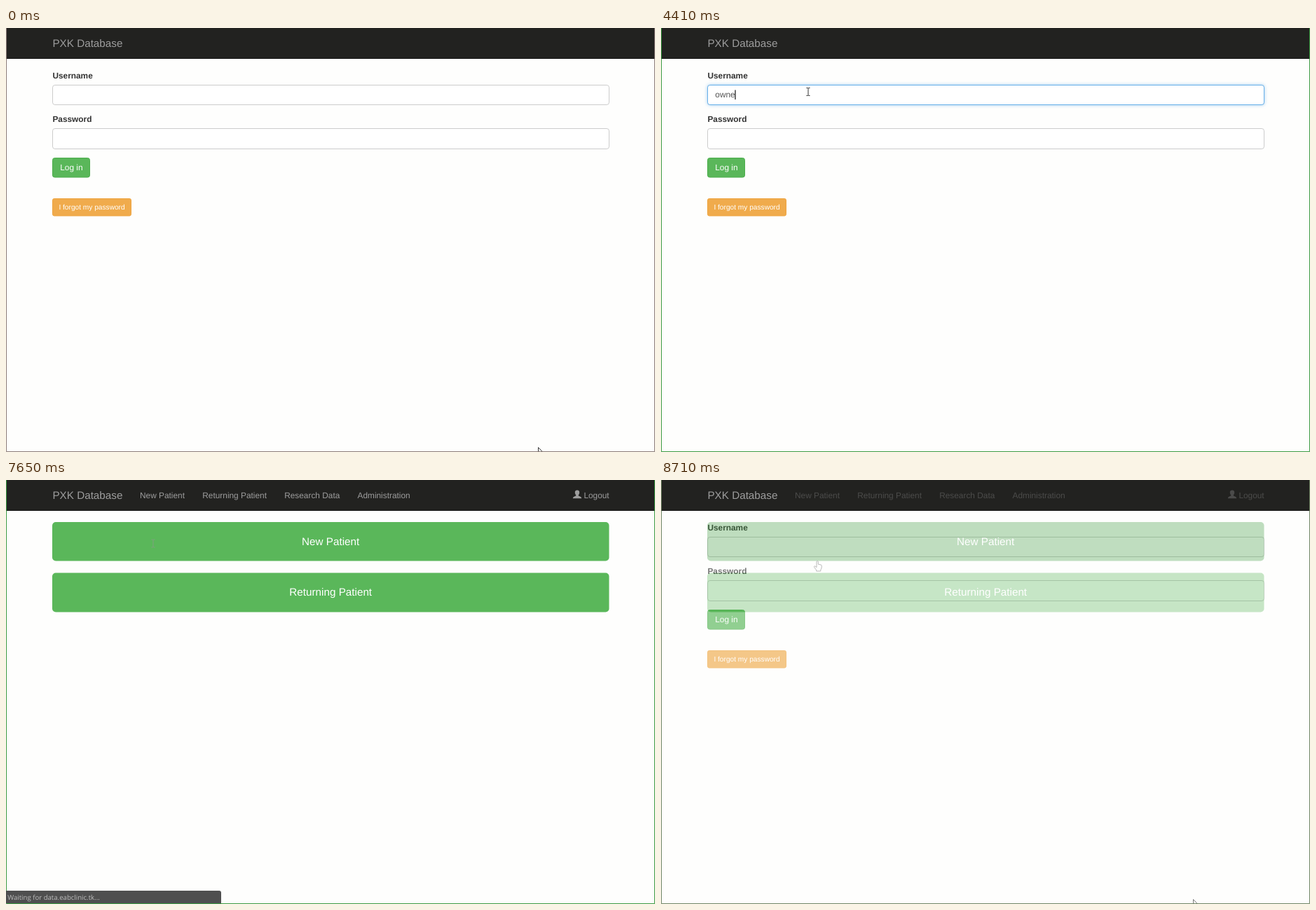
An HTML page for the animation above (8.78 s loop, 926x605 px).

```html
<!DOCTYPE html>
<html lang="en">
<head>
<meta charset="utf-8">
<title>Database login</title>
<style>
html, body { margin: 0; width: 100%; height: 100%; overflow: hidden; background: #fefefd; }
svg { display: block; width: 926px; height: 605px; }
text { font: 11.86px "Liberation Sans", Arial, sans-serif; text-rendering: geometricPrecision; white-space: pre; }
.brand { font-size: 15.25px; fill: #9d9d9d; }
.nav { fill: #9d9d9d; }
.label { font-weight: bold; fill: #333; }
.typed { fill: #555; }
.white { fill: #fff; }
.big { font-size: 15.25px; fill: #fff; text-anchor: middle; }
.small { font-size: 10.16px; fill: #fff; }
.box { fill: #fff; stroke: #ccc; }
.glow { fill: #fff; stroke: #66afe9; filter: drop-shadow(0 0 2.4px rgba(102, 175, 233, .6)); }
.green { fill: #5ab75a; }
.pointer { fill: #fff; stroke: #222; stroke-width: .9; stroke-linejoin: round; }
.beam { fill: none; stroke: #333; stroke-width: 1; }
.status { font: 9.62px "Open Sans", "Noto Sans", sans-serif; fill: #bdbdbd; }
</style>
</head>
<body>
<svg viewBox="0 0 926 605">
  <defs>
    <g id="bar">
      <rect width="926" height="605" fill="#fefefd"/>
      <rect width="926" height="44" fill="#222220"/>
      <rect y="43" width="926" height="1" fill="#121211"/>
      <text class="brand" x="66.4" y="27">PXK Database</text>
    </g>
    <path id="edge" d="M.5 0V604.5H925.5V0" fill="none"/>
    <path id="ibeam" d="M-2.5 -5.5H-.8L0 -4.8L.8 -5.5H2.5M0 -4.8V4.8M-2.5 5.5H-.8L0 4.8L.8 5.5H2.5"/>
  </defs>

  <g id="dash">
    <use href="#bar"/>
    <text class="nav" x="191" y="25.5">New Patient</text>
    <text class="nav" x="280.3" y="25.5">Returning Patient</text>
    <text class="nav" x="397.2" y="25.5">Research Data</text>
    <text class="nav" x="501.5" y="25.5">Administration</text>
    <text class="nav" x="824.4" y="25.5">Logout</text>
    <path class="nav" d="M815 14.5C817.3 14.5 818.3 16 818.2 18C818.1 19.7 817.4 20.7 816.8 21.4V22.4L820 23.9Q821.2 24.5 821.2 26.2H808.8Q808.8 24.5 810 23.9L813.2 22.4V21.4C812.6 20.7 811.9 19.7 811.8 18C811.7 16 812.7 14.5 815 14.5Z"/>
    <rect id="first" class="green" x="66" y="60" width="794.5" height="55.5" rx="5"/>
    <rect class="green" x="66" y="132.5" width="794.5" height="56" rx="5"/>
    <text class="big" x="463.2" y="92.5">New Patient</text>
    <text class="big" x="463.2" y="164.8">Returning Patient</text>
    <use id="paleBeam" class="beam" href="#ibeam" x="210" y="90.5" style="stroke:#7fa07f"/>
    <path id="hand" class="pointer" d="M222 116.2Q223.3 114.8 224.3 116.2V120.2L228 121Q229.4 121.3 229.3 122.8L229 126L227.8 128.2V130H221.6V128.4L218.6 124.4Q218 123 219.4 122.7L222 124.6Z"/>
    <use href="#edge" stroke="#3c9a42"/>
  </g>

  <g id="login">
    <use href="#bar"/>
    <text class="label" x="66.4" y="72.3">Username</text>
    <text class="label" x="66.4" y="134.4">Password</text>
    <rect class="box" x="66.5" y="81.5" width="794" height="28" rx="3.4"/>
    <rect class="box" x="66.5" y="143.5" width="794" height="29" rx="3.4"/>
    <rect id="glowUser" class="glow" x="66.5" y="81.5" width="794" height="28" rx="3.4"/>
    <rect id="glowPass" class="glow" x="66.5" y="143.5" width="794" height="29" rx="3.4"/>
    <text id="user" class="typed" x="77.3" y="99.4"></text>
    <text id="pass" class="typed" x="77.3" y="161.6"></text>
    <rect id="caret" width="1.3" height="13.5" fill="#222"/>
    <rect x="66.5" y="185.5" width="53" height="27.5" rx="3" fill="#5ab75a" stroke="#4cae4c"/>
    <text class="white" x="77.2" y="203">Log in</text>
    <rect x="66.5" y="243.5" width="112" height="24.5" rx="2.3" fill="#f0ab4c" stroke="#eea540"/>
    <text class="small" x="75.4" y="259.2">I forgot my password</text>
    <path id="arrow" class="pointer" d="M.5 .5V11.2L3 9L4.8 12.8L6.5 12L4.8 8.3H8Z"/>
    <use id="beam" class="beam" href="#ibeam"/>
    <use id="rim" href="#edge"/>
  </g>

  <g id="status">
    <path d="M0 586H304Q307 586 307 589V604H0Z" fill="#4f4f4f"/>
    <text class="status" x="2.2" y="599">Waiting for data.eabclinic.tk...</text>
  </g>
</svg>
<script>
const LOOP = 8780, STEP = 90, LEFT = 77.3, EM = 11.86;
const $ = id => document.getElementById(id);
const clamp = v => Math.max(0, Math.min(1, v));
const show = (id, a) => $(id).setAttribute('opacity', +a);

// pointer path: time, x, y
const path = [[0, 759, 598], [900, 444, 321], [1170, 355, 256], [1800, 236, 140], [2430, 210, 91]];
const userKeys = [3960, 4050, 4230, 4410, 4500];
const passKeys = [5670, 5850, 5940, 6120, 6390, 6570, 6660, 6840];
const userName = 'owner';
const userEnds = [0, .556, 1.278, 1.834, 2.39, 2.723];
const dotWidth = .35;

const typed = (keys, t) => keys.filter(k => t >= k).length;

// smooth curve through the path points
function pointer(t) {
  const last = path.length - 1;
  if (t >= path[last][0]) return path[last].slice(1);
  const i = path.findIndex(p => p[0] > t) - 1;
  const a = path[i], b = path[i + 1], span = b[0] - a[0], u = (t - a[0]) / span;
  const slope = (j, k) => {
    const p = path[Math.max(0, j - 1)], q = path[Math.min(last, j + 1)];
    return (q[k] - p[k]) / (q[0] - p[0]) * span;
  };
  return [1, 2].map(k =>
    (1 + 2 * u) * (1 - u) ** 2 * a[k] + u * (1 - u) ** 2 * slope(i, k) +
    u * u * (3 - 2 * u) * b[k] + u * u * (u - 1) * slope(i + 1, k));
}

function drawForm(t) {
  const n = typed(userKeys, t), m = typed(passKeys, t);
  const inPass = t >= 4770;
  const swap = clamp((t - 4680) / 360);
  show('glowUser', clamp((t - 2430) / 270) * (1 - swap));
  show('glowPass', swap);
  $('user').textContent = userName.slice(0, n);
  $('pass').textContent = '•'.repeat(m);

  const off = t < 2700 || (t >= 3330 && t < 3960) || (t >= 4770 && t < 4950) ||
    (t >= 5580 && t < 5670) || (t >= 7290 && t < 7470);
  show('caret', !off);
  $('caret').setAttribute('x', LEFT + EM * (inPass ? m * dotWidth : userEnds[n]) - .3);
  $('caret').setAttribute('y', inPass ? 151 : 88.5);

  const [x, y] = pointer(t), overField = y < 109.5;
  show('arrow', !overField);
  show('beam', overField);
  $(overField ? 'beam' : 'arrow').setAttribute('transform', `translate(${Math.round(x)} ${Math.round(y)})`);
  $('rim').setAttribute('stroke', t < 2250 ? '#8b7b77' : '#3c9a42');
}

function render(t) {
  const fade = t >= 8710 ? .66 : t >= 8640 ? .33 : 0;
  const q = Math.floor(t / STEP) * STEP;
  const hover = q >= 8550;
  drawForm(fade ? 0 : q);
  show('login', q < 7650 ? 1 : fade);
  $('first').style.fill = hover ? '#449d44' : '';
  show('hand', hover);
  show('paleBeam', !hover);
  show('status', q < 7560 ? 0 : 1 - clamp((q - 7920) / 360));
}

function tick() {
  render(performance.now() % LOOP);
  requestAnimationFrame(tick);
}
tick();
</script>
</body>
</html>
```
